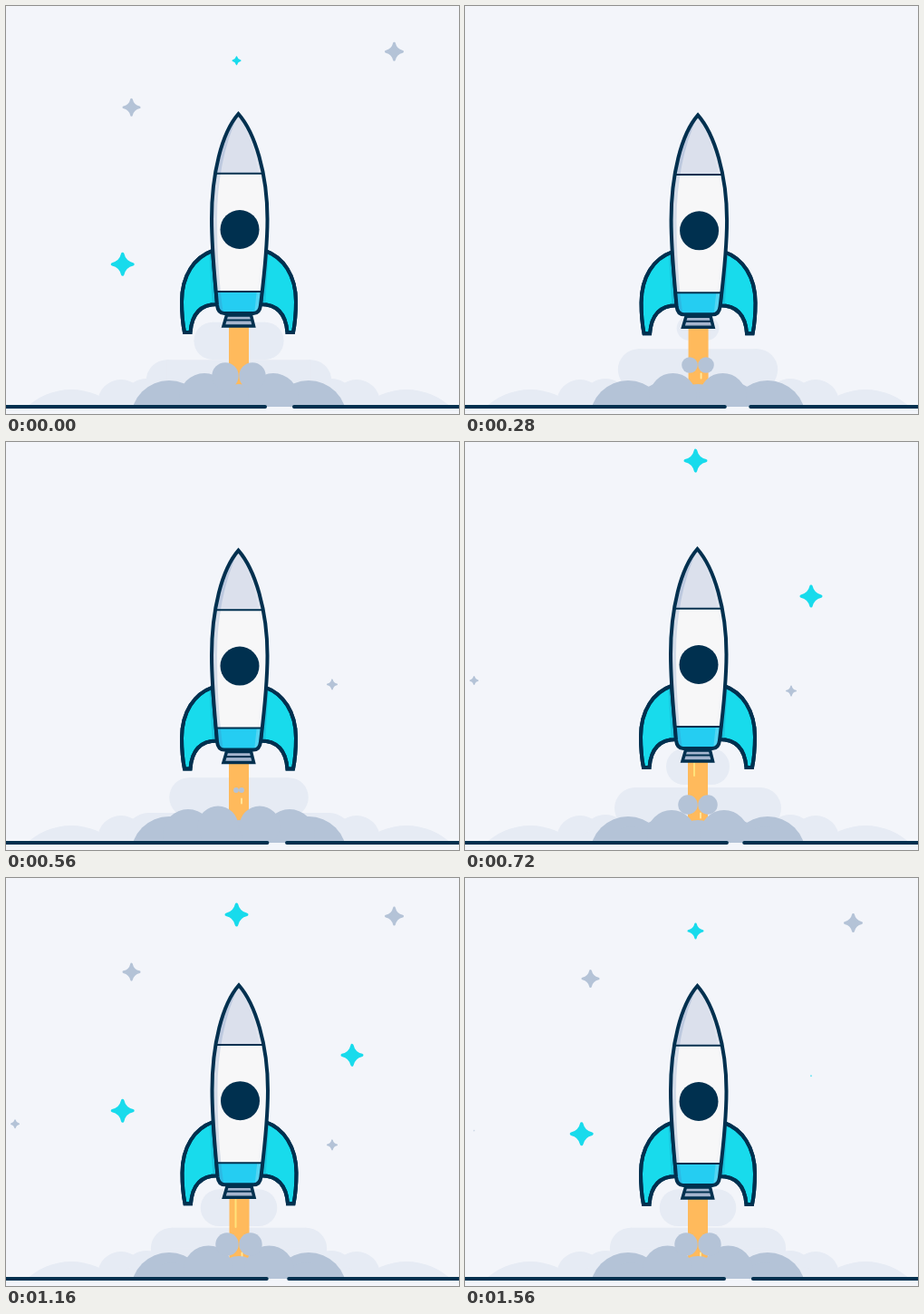
An HTML page with a canvas for the animation above (1.6 s loop, 500 px wide and 450 px high).

```html
<!DOCTYPE html>
<html lang="en">
<head>
<meta charset="utf-8">
<title>Rocket launch</title>
<style>
html, body { margin: 0; width: 100%; height: 100%; overflow: hidden; background: #f3f5fa; }
canvas { display: block; width: 500px; height: 450px; }
</style>
</head>
<body>
<canvas id="stage" width="500" height="450"></canvas>
<script>
const ctx = document.getElementById('stage').getContext('2d');
const LOOP = 1600, STEP = 40, PUFF_PERIOD = 400, CENTER = 257;
const NAVY = '#00304f', CYAN = '#18dbec', GREY = '#b4c3d7', MIST = '#e6ebf4', SKY = '#f3f5fa';

const clamp = (v, lo = 0, hi = 1) => Math.min(hi, Math.max(lo, v));

// Linear interpolation through [time, value] pairs
function track(keys, t) {
  if (t <= keys[0][0]) return keys[0][1];
  for (let i = 1; i < keys.length; i++) {
    const [t0, a] = keys[i - 1], [t1, b] = keys[i];
    if (t <= t1) return a + (b - a) * (t - t0) / (t1 - t0);
  }
  return keys[keys.length - 1][1];
}

function circle(x, y, r, color) {
  ctx.fillStyle = color;
  ctx.beginPath();
  ctx.arc(x, y, Math.max(0, r), 0, Math.PI * 2);
  ctx.fill();
}

function mirrored(offset, y, r, color) {
  circle(CENTER - offset, y, r, color);
  circle(CENTER + offset, y, r, color);
}

function line(x1, y1, x2, y2, color, width, cap = 'butt') {
  ctx.strokeStyle = color;
  ctx.lineWidth = width;
  ctx.lineCap = cap;
  ctx.beginPath();
  ctx.moveTo(x1, y1);
  ctx.lineTo(x2, y2);
  ctx.stroke();
}

// Each star drifts down, growing in at birth and shrinking at the end of its life
const stars = [
  { x: 254.5, y: 14.8, speed: .045, size: 13, born: 590, life: 1060, color: CYAN },
  { x: 428.5, y: 36, speed: .0187, size: 10.5, born: 835, life: 1010, color: GREY },
  { x: 138.5, y: 96.7, speed: .0187, size: 10, born: 790, life: 1020, color: GREY },
  { x: 128.7, y: 232.8, speed: .0638, size: 13, born: 785, life: 1025, color: CYAN },
  { x: 382, y: 162.3, speed: .0575, size: 12.5, born: 585, life: 985, color: CYAN },
  { x: 360, y: 261.3, speed: .045, size: 6, born: 425, life: 1020, color: GREY },
  { x: 10, y: 260.5, speed: .0187, size: 5, born: 585, life: 995, color: GREY }
];

function drawStar(star, time) {
  const age = (time - star.born + LOOP) % LOOP;
  if (age >= star.life) return;
  const s = star.size * clamp(Math.min(age, star.life - age) / 130);
  const tip = s * .87, waist = s * .16;
  ctx.save();
  ctx.translate(star.x, star.y + star.speed * age);
  ctx.fillStyle = ctx.strokeStyle = star.color;
  ctx.lineWidth = s * .26;
  ctx.lineJoin = 'round';
  ctx.beginPath();
  ctx.moveTo(0, -tip);
  ctx.quadraticCurveTo(waist, -waist, tip, 0);
  ctx.quadraticCurveTo(waist, waist, 0, tip);
  ctx.quadraticCurveTo(-waist, waist, -tip, 0);
  ctx.quadraticCurveTo(-waist, -waist, 0, -tip);
  ctx.closePath();
  ctx.fill();
  if (s > 0) ctx.stroke();
  ctx.restore();
}

const mistSpread = [[200, 0], [320, 15], [440, 36], [560, 55], [720, 69], [960, 100], [1120, 115]];
const mistHeight = [[200, 350], [320, 358], [440, 375], [560, 392], [720, 404], [960, 432], [1120, 452]];
const mistRadius = [[200, 0], [320, 20], [720, 23]];
const puffSpread = [[100, 0], [560, 23], [720, 29], [800, 38], [1120, 74]];
const puffHeight = [[100, 378], [560, 424], [720, 433], [960, 433], [1120, 452]];
const puffRadius = [[100, 0], [560, 22.5], [720, 27], [800, 28]];

// Ages of all overlapping generations, oldest first
function generations(time) {
  const phase = time % PUFF_PERIOD;
  return [800, 400, 0].map(offset => phase + offset);
}

function drawMist(time) {
  mirrored(185, 495, 72, MIST);
  mirrored(130, 438, 26, MIST);
  mirrored(102, 438, 27, MIST);
  for (const age of generations(time)) {
    const dx = track(mistSpread, age), y = track(mistHeight, age), r = track(mistRadius, age);
    if (!r) continue;
    mirrored(dx, y, r, MIST);
    ctx.fillRect(CENTER - dx, y - r, dx * 2, r * 2);
    if (age > 430) ctx.fillRect(CENTER - dx, y, dx * 2, 442 - y);
  }
}

function drawSmoke(time) {
  mirrored(77, 455, 42, GREY);
  mirrored(38, 445, 30, GREY);
  circle(CENTER, 445, 28, GREY);
  for (const age of generations(time))
    mirrored(track(puffSpread, age), track(puffHeight, age), track(puffRadius, age), GREY);
}

function drawFlame(time, dx) {
  ctx.fillStyle = '#ffba5c';
  ctx.fillRect(246 + dx, 345, 22, 75);
  if (time >= 640 && time < 1400) {
    const top = track([[640, 348], [720, 353], [1160, 355], [1400, 384]], time);
    const end = track([[640, 352], [720, 368], [920, 377], [1160, 385]], time);
    line(253 + dx, top, 253 + dx, end, '#ffe27a', 2, 'round');
  }
  const phase = time % PUFF_PERIOD;
  if (phase) {
    const y = 380 + phase * .1;
    line(260 + dx, y - 2.5, 260 + dx, y + 2.5, '#ffe9a0', 1.8, 'round');
  }
}

const shell = new Path2D('M256.5 119C238 140 227 185 227 235C227 270 231 305 233 330Q234 339 241 339H273Q280 339 281 330C284 305 288.5 270 288.5 235C288.5 185 275 140 256.5 119Z');
const shade = new Path2D('M256.5 119C228 150 224 185 224 235L230 340H240C235 305 233 270 233 235C233 195 240 155 256.5 119Z');
const gleam = new Path2D('M256.5 119C277 155 282 195 282 235C282 270 278 305 274 340H290V119Z');
const fin = new Path2D('M228 270C208 277 194 297 194 326Q194 345 197 360H203.500C205 340 214 329 233 329Z');
const nozzle = new Path2D('M243.500 341H270.500L273.500 353H240Z');

function outline(path, fill, width = 4) {
  ctx.fillStyle = fill;
  ctx.fill(path);
  ctx.strokeStyle = NAVY;
  ctx.lineWidth = width;
  ctx.lineJoin = 'miter';
  ctx.stroke(path);
}

function drawFin() {
  outline(fin, CYAN);
  ctx.save();
  ctx.clip(fin);
  line(228, 266, 232, 332, '#1bc3dd', 8);
  ctx.restore();
  ctx.strokeStyle = NAVY;
  ctx.lineWidth = 4;
  ctx.stroke(fin);
}

function drawRocket(dx, dy) {
  ctx.save();
  ctx.translate(dx, dy);

  drawFin();
  ctx.save();
  ctx.translate(514, 0);
  ctx.scale(-1, 1);
  drawFin();
  ctx.restore();

  outline(nozzle, '#a5b5ce', 3.5);
  line(243, 346.5, 271, 346.5, NAVY, 2);

  ctx.save();
  ctx.clip(shell);
  const bands = [[115, 70, '#dbe0ec'], [185, 130, '#f7f7f8'], [315, 30, '#25cdf2']];
  for (const [y, h, color] of bands) {
    ctx.fillStyle = color;
    ctx.fillRect(220, y, 76, h);
  }
  ctx.fillStyle = 'rgba(70,110,170,.2)';
  ctx.fill(shade);
  ctx.fillStyle = 'rgba(240,242,247,.22)';
  ctx.fill(gleam);
  line(225, 184.7, 290, 184.7, NAVY, 2);
  line(225, 315, 290, 315, NAVY, 2);
  ctx.restore();

  ctx.strokeStyle = NAVY;
  ctx.lineWidth = 4;
  ctx.lineJoin = 'miter';
  ctx.stroke(shell);
  circle(258, 246.5, 21.5, NAVY);
  ctx.restore();
}

function drawGround(time) {
  const sway = Math.cos(time / LOOP * Math.PI * 2);
  line(-4, 442, 287.5 - 1.5 * sway, 442, NAVY, 4, 'round');
  line(313 + 5 * sway, 442, 504, 442, NAVY, 4, 'round');
}

const shakeX = [[0, 0], [160, 1], [440, 0], [720, 0], [920, -.7], [1160, .5], [1560, 0]];
const shakeY = [[0, 0], [160, 1], [440, 1.8], [720, -1], [920, -.3], [1160, -.8], [1560, 0]];

function render(time) {
  ctx.fillStyle = SKY;
  ctx.fillRect(0, 0, 500, 450);
  stars.forEach(star => drawStar(star, time));
  const dx = track(shakeX, time), dy = track(shakeY, time);

  ctx.save();
  ctx.beginPath();
  ctx.rect(0, 0, 500, 442);
  ctx.clip();
  drawMist(time);
  drawFlame(time, dx);
  drawSmoke(time);
  ctx.restore();

  drawRocket(dx, dy);
  drawGround(time);
}

let start;
function frame(now) {
  if (start === undefined) start = now;
  const elapsed = Math.max(0, now - start) % LOOP;
  render(Math.floor(elapsed / STEP) * STEP);
  requestAnimationFrame(frame);
}
render(0);
requestAnimationFrame(frame);
</script>
</body>
</html>
```
